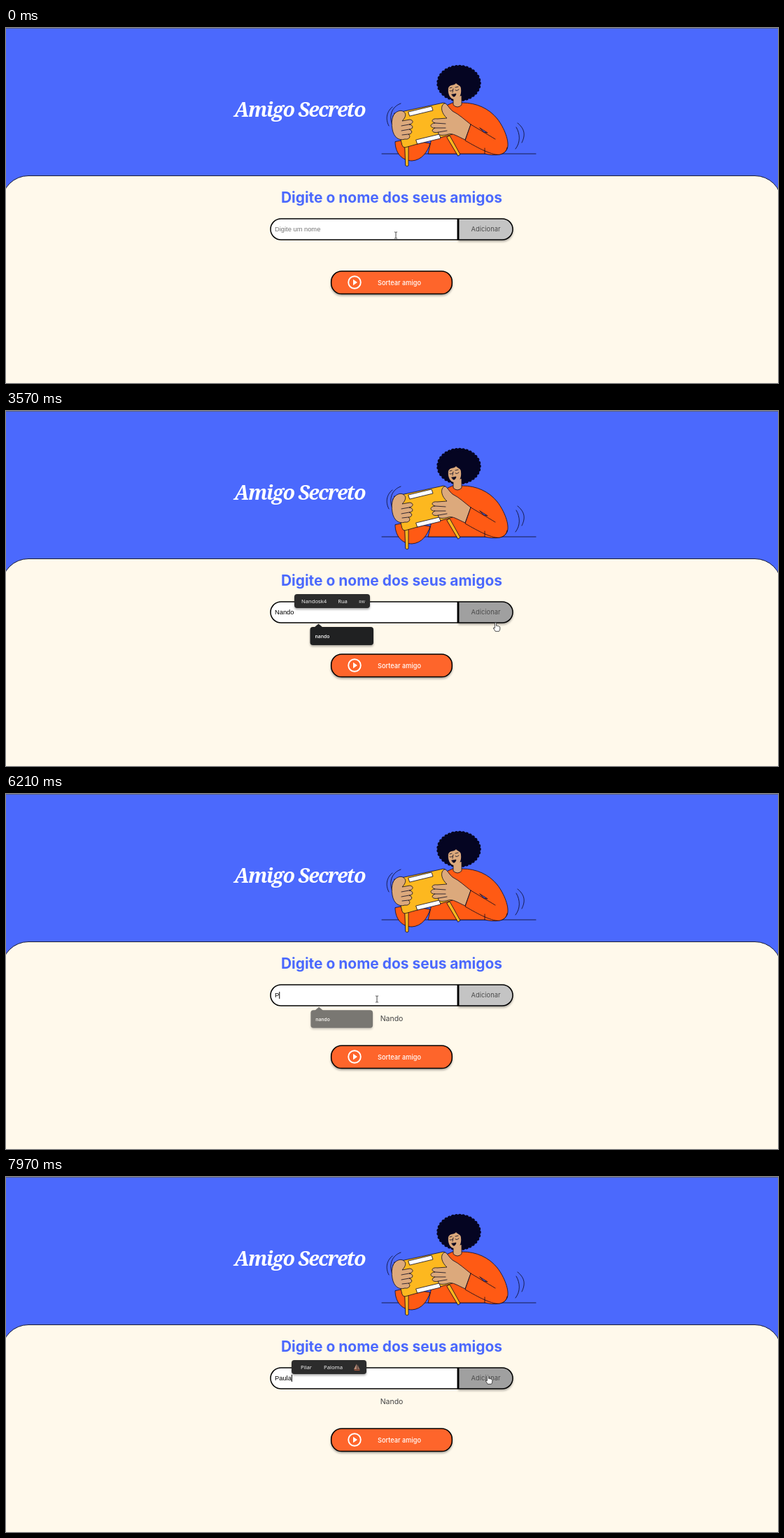
An HTML page for the animation above (8 s loop, 1103 by 508 pixels).

```html
<!DOCTYPE html>
<html lang="pt">
<head>
<meta charset="utf-8">
<title>Amigo Secreto</title>
<style>
  html, body { margin: 0; height: 100%; overflow: hidden; background: #fff9eb; }
  svg { display: block; width: 1103px; height: 508px; font: 9.33px Inter, sans-serif; font-optical-sizing: none; }
  .mid { text-anchor: middle; }
  .title { font: italic 900 28.5px "Noto Serif", serif; letter-spacing: -1.6px; fill: #fff; }
  .heading { font-size: 20.95px; font-weight: 700; fill: #4b69fd; }
  .field { font-family: "Liberation Sans", Arial, sans-serif; }
  .tip { font: 7.7px "Open Sans", "Noto Sans", sans-serif; fill: #fff; }
  .box { stroke: #000; stroke-width: 1.5; }
  .shadow { filter: drop-shadow(0 2px 1.5px #0005); }
  .art { stroke: #0b0a20; stroke-width: .8; stroke-linejoin: round; stroke-linecap: round; }
  .skin { fill: #dca97c; }
  .orange { fill: #ff5a14; }
  .yellow { fill: #fdb81f; }
  .line { fill: none; }
</style>
</head>
<body>
<svg viewBox="0 0 1103 508">
  <rect width="1103" height="508" fill="#4b69fd"/>
  <rect width="1103" height="1" fill="#56618f"/>
  <rect x="-6" y="211.5" width="1114" height="340" rx="38" fill="#fff9eb" stroke="#1a1d33"/>
  <text class="title mid" x="419.5" y="127">Amigo Secreto</text>

  <g class="art">
    <path class="line" d="M537 180H757"/>
    <path class="line" d="M552 113C542 121 543 133 547 140M564 108C550 113 547 127 552 139M731 136C742 145 742 154 737 164M729 142C735 152 735 164 728 173"/>
    <g fill="#050522">
      <ellipse cx="647" cy="79" rx="29.5" ry="24.5"/>
      <ellipse cx="647" cy="79" rx="29" ry="23.5" fill="none" stroke="#050522" stroke-width="5.5" stroke-dasharray="0 5"/>
    </g>
    <path class="orange" d="M556 163C556 178 565 190 580 190C594 189 602 178 606 165L570 160Z"/>
    <path class="orange" d="M627 112L638 107H652C672 107 690 115 702 130C712 143 720 163 716 173C711 183 697 183 684 180H603L610 150Z"/>
    <path class="skin" d="M639 99V110Q645 116 651 110V97"/>
    <path class="skin" stroke="none" d="M632 86C634 80 640 83 643 79C645 82 650 82 650 87C651 95 648 102 641 102C634 102 631 94 632 86Z"/>
    <path class="line" d="M634 86L637 85M642 85L646 84M634 90Q636 91 638 89M642 89Q644 91 647 88M639 87L638 92"/>
    <path fill="#120c20" d="M637 95Q640 95 643 94Q642 99 639 98Z"/>
    <path class="yellow" d="M570 168H575V197Q573 199 571 197ZM630 156L634 154L649 181L646 183Z"/>
    <path class="yellow" d="M555 122L625 107Q628 107 629 110L638 152L570 171Q567 171 566 168Z"/>
    <path fill="#fff" d="M575 120L608 112L610 118L577 126ZM586 160L619 152L621 158L588 166Z"/>
    <path class="skin" d="M553 126C556 120 562 117 567 119C573 122 571 128 566 133L577 131C583 132 582 137 576 138C583 139 582 145 576 145C582 147 580 152 575 152C579 155 576 160 570 159C561 162 554 156 552 145Q550 134 553 126Z"/>
    <path class="line" d="M576 138L565 140M576 145L565 147M575 152L566 153"/>
    <path class="skin" d="M664 138L656 160C645 155 638 150 632 152C622 155 616 153 618 149C609 151 606 146 613 143C605 143 605 137 613 136C606 134 609 129 616 130L630 129C622 122 620 112 626 108C630 107 632 114 638 119C648 124 656 132 664 138Z"/>
    <path class="line" d="M613 136L628 137M613 143L628 143M618 149L630 147"/>
    <path class="orange" d="M664 138L656 161C675 172 695 183 706 181C717 178 718 168 712 158L699 159Z" stroke="none"/>
    <path class="line" d="M699 159L664 138L656 161C675 172 695 183 706 181Q715 179 716 171M684 172V180"/>
    <path fill="#4b69fd" d="M677 143L688 150L683 149Z"/>
  </g>

  <text class="heading mid" x="551" y="249.5">Digite o nome dos seus amigos</text>

  <path id="add" class="box shadow" d="M646.7 273H709a15 15 0 0 1 0 30H646.7Z"/>
  <path class="box" fill="#fff" d="M645.3 273H393a15 15 0 0 0 0 30H645.3Z"/>
  <text class="mid" x="685.5" y="291.3" fill="#4c4c4c">Adicionar</text>
  <text id="hint" class="field" x="384" y="291" fill="#757575">Digite um nome</text>
  <text id="typed" class="field" x="384" y="291"></text>
  <rect id="caret" y="283" width="1" height="10"/>

  <text id="friend" class="mid" x="551" y="325" font-size="10.5" fill="#444">Nando</text>
  <g id="draw">
    <rect class="box shadow" x="464.7" y="348" width="172.6" height="32.6" rx="15" fill="#fe652b"/>
    <circle cx="498" cy="364" r="8.8" fill="none" stroke="#fff" stroke-width="1.9"/>
    <path d="M496 359.8L502 364L496 368.2Z" fill="#fff"/>
    <text class="mid" x="562" y="367.8" fill="#fff" font-size="9.2" font-weight="500">Sortear amigo</text>
  </g>

  <g id="popup" class="shadow">
    <path d="M440 310L446.5 304.5L453 310Z" fill="#202122"/>
    <rect x="434.5" y="309" width="90.5" height="26" rx="4" fill="#202122"/>
    <text class="tip" x="441.5" y="325" style="font-size:6.8px;font-weight:600">nando</text>
  </g>
  <g id="bars"></g>

  <circle id="click" r="6.7" fill="#fdf56e" opacity=".9"/>
  <path id="beam" d="M-2-4.5H-.5L0-4L.5-4.5H2M0-4V4M-2 4.5H-.5L0 4L.5 4.5H2" fill="none" stroke="#333" stroke-width=".9"/>
  <path id="hand" d="M-2.6 1V-5Q-1.5-7-.4-5V-1.5Q.8-2.3 1.7-1.1Q2.8-1.8 3.5-.5Q4.8-.8 4.8.8V3Q4.6 5 3.4 6.3H-1.8Q-3 4-4.7 2Q-5 .3-2.6 1.7Z" fill="#fff" stroke="#222" stroke-width=".8"/>
</svg>
<script>
const $ = id => document.getElementById(id);
const LOOP = 8000, ADDED = 4520, FADE = 175;

// Steps: [start time, value]
const texts = [[0, ''], [1820, 'N'], [2230, 'Na'], [2300, 'Nan'], [2500, 'Nand'], [2560, 'Nando'], [4450, ''],
  [6140, 'P'], [6340, 'Pa'], [6550, 'Pau'], [6610, 'Paul'], [6810, 'Paula']];
const carets = [[0, 0], [500, 1], [1040, 0], [1550, 1], [3090, 0], [3620, 1], [4250, 0],
  [5210, 1], [5740, 0], [6140, 1], [7340, 0], [7870, 1]];
const barSteps = [[0, -1], [2030, 0], [2760, 1], [4450, -1], [6490, 2], [6810, -1], [7010, 3]];
const clicks = [500, 4450, 5210];
const popups = [[500, 4450], [5210, 6140]];

// Pointer keys: [time, x, y]
const path = [[0, 557, 296.5], [3220, 557, 296.5], [3570, 701, 309], [3780, 699, 299], [4590, 699, 299],
  [5010, 530, 293.5], [7200, 530, 293.5], [7700, 694, 309], [7970, 690, 290], [LOOP, 690, 290]];

// Suggestion bars: left, right, then words with their centres
const bars = [
  [391, 524, [[413.5, 'Recebi'], [460, 'Realmente'], [506, 'Rapaz']]],
  [412, 520, [[440, 'Nandosk4'], [481, 'Rua'], [508.5, 'RW', 5.5]]],
  [397, 491, [[414, 'Má'], [443, 'Mas'], [474.5, 'Mais']]],
  [408, 515, [[429, 'Pilar'], [467.5, 'Paloma']]]
];
const sail = '<path d="M501 267.5V275H497Z" fill="#b98c78"/><path d="M501.7 268L505.5 275H501.7Z" fill="#8d6a5d"/><path d="M497 275.5H506L505 277H498Z" fill="#a4573e"/>';
$('bars').innerHTML = bars.map(([l, r, words], i) =>
  `<g class="shadow"><rect x="${l}" y="262" width="${r - l}" height="20" rx="4" fill="#2c2c2c"/>` +
  words.map(([x, s, size = 7.7]) => `<text class="tip mid" x="${x}" y="275" style="font-size:${size}px">${s}</text>`).join('') +
  (i === 3 ? sail : '') + '</g>').join('');

const at = (steps, t) => steps.filter(s => s[0] <= t).pop()[1];
const show = (el, on) => { el.style.display = on ? '' : 'none'; };

function pointer(t) {
  const i = path.findIndex(k => k[0] > t);
  const [t0, x0, y0] = path[i - 1], [t1, x1, y1] = path[i];
  const u = (t - t0) / (t1 - t0), e = u * u * (3 - 2 * u);
  return [x0 + (x1 - x0) * e, y0 + (y1 - y0) * e];
}

function render(t) {
  const text = at(texts, t), bar = at(barSteps, t);
  $('typed').textContent = text;
  show($('hint'), !text);
  $('caret').setAttribute('x', 384 + (text ? $('typed').getComputedTextLength() : 0));
  show($('caret'), at(carets, t));
  [...$('bars').children].forEach((g, i) => show(g, i === bar));

  const open = popups.find(([a, b]) => t >= a && t < b + FADE);
  show($('popup'), open);
  if (open) {
    const p = Math.max(0, (t - open[1]) / FADE);
    $('popup').setAttribute('opacity', 1 - p);
    $('popup').setAttribute('transform', `translate(479.5 322) scale(${1 - .05 * p}) translate(-479.5 -322)`);
  }

  show($('friend'), t >= ADDED);
  $('draw').setAttribute('transform', `translate(0 ${t >= ADDED ? 12 : 0})`);

  const [x, y] = pointer(t), hover = x > 647;
  $('add').setAttribute('fill', hover ? '#a0a0a0' : '#c4c4c4');
  for (const id of ['click', 'beam', 'hand']) $(id).setAttribute('transform', `translate(${x} ${y})`);
  show($('click'), clicks.some(c => t >= c && t < c + 70));
  show($('beam'), !hover);
  show($('hand'), hover);
}

function frame() {
  render(performance.now() % LOOP);
  requestAnimationFrame(frame);
}
frame();
</script>
</body>
</html>
```
